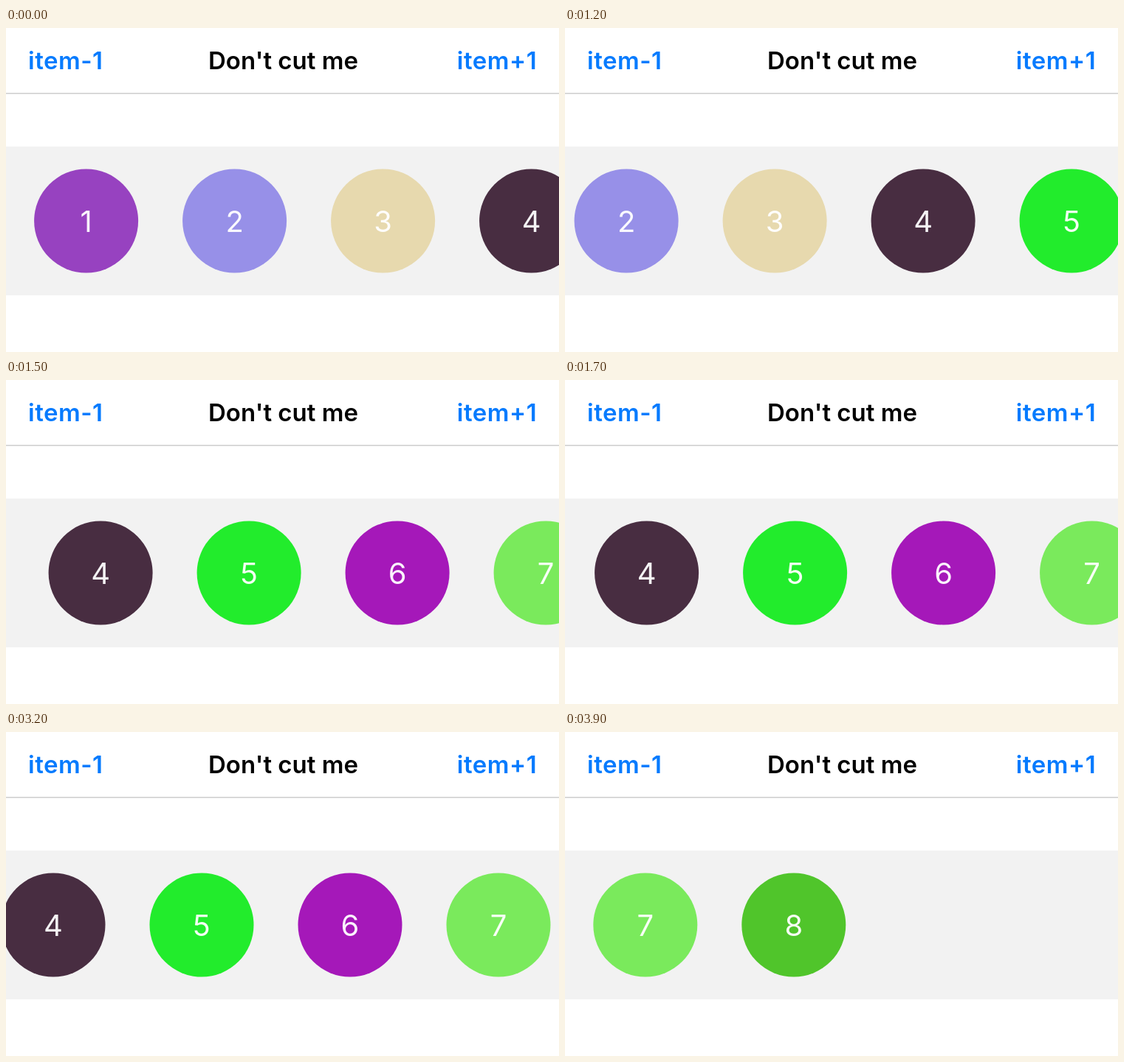
Recreate the animation shown at these times as an HTML page. Size 749x440 px, loop 4600 ms.

```html
<!DOCTYPE html>
<html lang="en">
<head>
<meta charset="utf-8">
<title>Item scroller</title>
<style>
  html, body { margin: 0; width: 100%; height: 100%; overflow: hidden; background: #fff; }
  svg { display: block; font-family: Inter, Roboto, sans-serif; }
  .bar { font-size: 33px; font-weight: 600; }
  .link { fill: #067bfe; letter-spacing: .5px; }
  #items { font-size: 40px; text-anchor: middle; }
  #items text { fill: #fff; fill-opacity: .95; }
</style>
</head>
<body>
<svg width="749" height="440" viewBox="0 0 749 440">
  <rect y="161" width="749" height="202" fill="#f2f2f2"/>
  <g id="items"></g>
  <rect y="88" width="749" height="1.6" fill="#cfcfcf"/>
  <g class="bar">
    <text class="link" x="30" y="56">item-1</text>
    <text x="375.5" y="56" text-anchor="middle">Don't cut me</text>
    <text class="link" x="719.2" y="56" text-anchor="end">item+1</text>
  </g>
</svg>
<script>
const LOOP = 4600, STEP = 100, GAP = 201, PAGE = 3 * GAP;
const colors = ['#9742c0', '#9790e8', '#e7d9ae', '#482d41', '#22ec2c', '#a518b9', '#7aea5c', '#50c52b'];
// Each page turn: first visible step, spring phase at that step, spring rate per ms
const turns = [
  { at: 1200, phase: 1.307, rate: .0132 },
  { at: 3200, phase: .445, rate: .0141 }
];
const items = document.getElementById('items');

items.innerHTML = colors.map((color, i) => {
  const x = 108.6 + i * GAP;
  return `<circle cx="${x}" cy="262" r="70.5" fill="${color}"/><text x="${x}" y="276.5">${i + 1}</text>`;
}).join('');

// Critically damped spring from 0 to 1
function spring(t, { at, phase, rate }) {
  if (t < at) return 0;
  const x = phase + rate * (t - at);
  return 1 - (1 + x) * Math.exp(-x);
}

function draw(now) {
  const t = Math.floor(now % LOOP / STEP) * STEP;
  const offset = turns.reduce((sum, turn) => sum + PAGE * spring(t, turn), 0);
  items.setAttribute('transform', `translate(${-offset.toFixed(1)} 0)`);
}

const start = performance.now();
function tick() {
  draw(performance.now() - start);
  requestAnimationFrame(tick);
}
tick();
</script>
</body>
</html>
```
